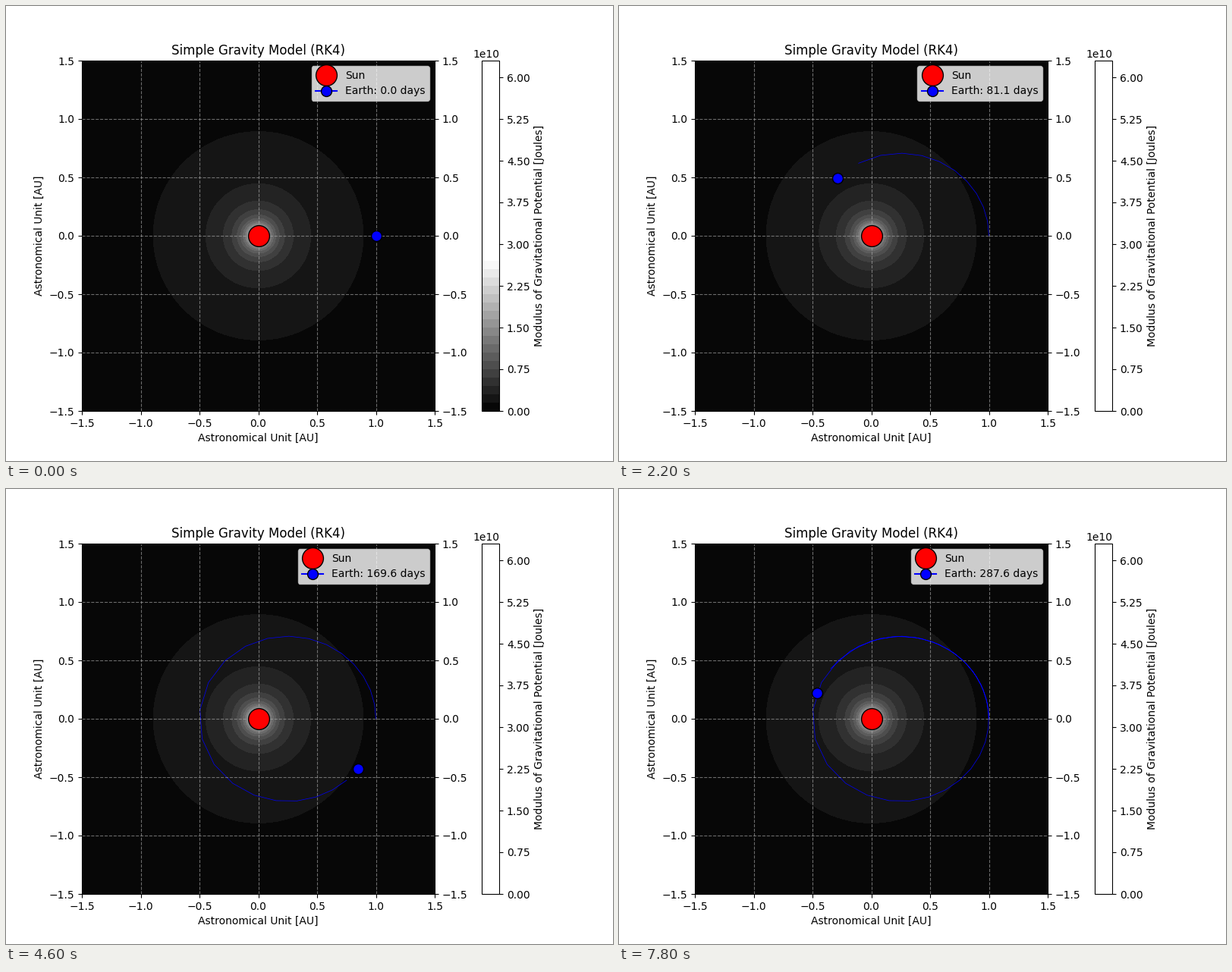
A matplotlib script that plays this animation: 800x600 px, repeating every 8000 ms.

```python
import numpy as np
import matplotlib.pyplot as plt
from matplotlib.animation import FuncAnimation

FRAMES = 40
STEP_DAYS = 730 / 99
PERIOD = 196.2           # days per revolution
AXIS, ECC = 0.75, 1 / 3  # orbit size in AU and eccentricity
POTENTIAL = 1.338e9      # modulus at 1 AU


def orbit(days):
    """Position on the ellipse, starting at aphelion (1, 0)."""
    mean = 2 * np.pi * days / PERIOD
    ecc_anom = mean
    for _ in range(12):
        error = ecc_anom + ECC * np.sin(ecc_anom) - mean
        ecc_anom = ecc_anom - error / (1 + ECC * np.cos(ecc_anom))
    x = AXIS * (ECC + np.cos(ecc_anom))
    y = AXIS * np.sqrt(1 - ECC ** 2) * np.sin(ecc_anom)
    return x, y


days = np.arange(FRAMES) * STEP_DAYS
xs, ys = orbit(days)

fig, ax = plt.subplots(figsize=(8, 6), dpi=100)

# Potential field and its colour scale
side = np.linspace(-1.5, 1.5, 100)
gx, gy = np.meshgrid(side, side)
field = ax.contourf(gx, gy, POTENTIAL / np.hypot(gx, gy),
                    levels=np.arange(43) * 0.15e10,
                    cmap="gray", vmin=0, vmax=2.7e10)
bar = fig.colorbar(field, ax=ax, pad=0.1)
bar.set_label("Modulus of Gravitational Potential [Joules]")

# Bodies
trail, = ax.plot([], [], "b-", lw=0.5, zorder=1.2)
ax.plot([0], [0], "o", color="red", ms=20, mec="black", label="Sun")
earth, = ax.plot([1], [0], "o-", color="blue", ms=10, mec="black",
                 label="Earth: 0.0 days")

ax.set(xlim=(-1.5, 1.5), ylim=(-1.5, 1.5),
       xlabel="Astronomical Unit [AU]", ylabel="Astronomical Unit [AU]",
       title="Simple Gravity Model (RK4)")
ax.set_xticks(np.arange(-1.5, 1.6, 0.5))
ax.set_yticks(np.arange(-1.5, 1.6, 0.5))
ax.tick_params(axis="y", right=True, labelright=True)
ax.grid(linestyle="--", alpha=0.6)
day_label = ax.legend(loc="upper right").get_texts()[1]


def update(i):
    trail.set_data(xs[:i], ys[:i])
    earth.set_data([xs[i]], [ys[i]])
    day_label.set_text(f"Earth: {days[i]:.1f} days")
    bar.solids.set_visible(i == 0)  # the scale is filled only at the start
    return trail, earth, day_label


anim = FuncAnimation(fig, update, frames=FRAMES, interval=200,
                     repeat=True, repeat_delay=0, blit=False)
plt.show()
```
